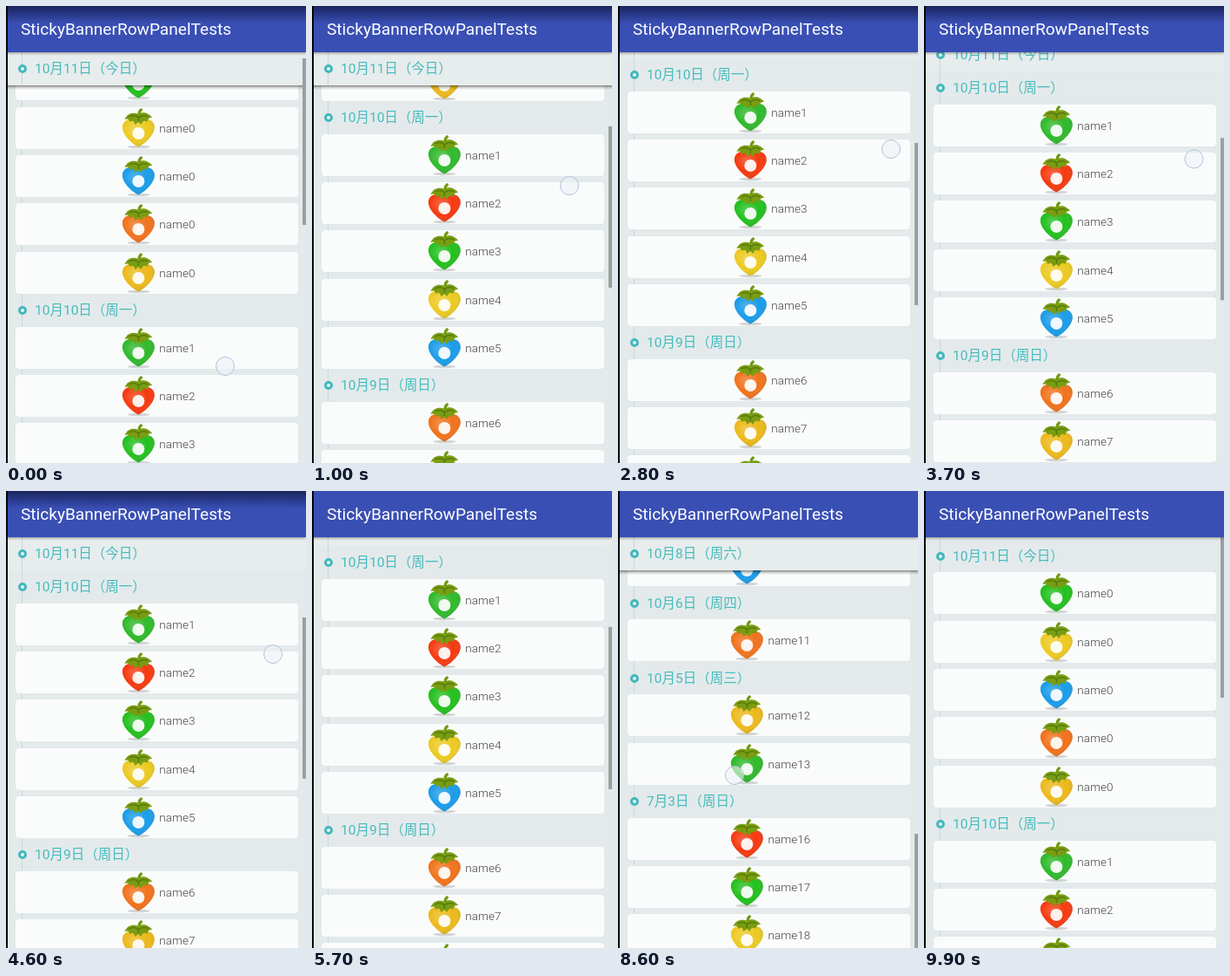
These frames come from a looping animation (345x524 px, 10 s). An HTML page:

```html
<!DOCTYPE html>
<html lang="zh-CN">
<head>
<meta charset="utf-8">
<title>Sticky list</title>
<style>
  html, body { margin: 0; width: 100%; height: 100%; overflow: hidden; }
  #stage {
    position: relative; width: 345px; height: 524px; overflow: hidden;
    background: #e4eaeb; font-family: Roboto, "Noto Sans CJK SC", "Noto Sans CJK", sans-serif;
  }
  #stage div, #stage svg { position: absolute; }
  .line { left: 17.5px; top: 0; width: 1.6px; height: 100%; background: #cdd5d6; }
  #list { left: 0; top: 0; width: 345px; will-change: transform; }
  .head {
    left: 0; width: 345px; height: 38px; padding-left: 33px; box-sizing: border-box;
    font-size: 15.5px; line-height: 38px; color: #46bbbe; white-space: nowrap;
  }
  .head::before {
    content: ""; position: absolute; left: 13.5px; top: 14px; width: 4.4px; height: 4.4px;
    border: 3px solid #42b8bc; border-radius: 50%; background: #eef3f3;
  }
  .card {
    left: 11px; width: 325px; height: 48px; border-radius: 4px; background: #fafcfb;
    box-shadow: 0 0 1px #d3dede; display: flex; justify-content: center; align-items: center;
    font-size: 13.5px; font-weight: 300; color: #444;
  }
  #stage .card svg { position: relative; left: -.8px; width: 46.7px; height: 48px; flex: none; }
  #pin { left: 0; top: 0; width: 345px; height: 38px; background: #e7ecec; }
  #pin .head { top: 0; }
  #shade {
    left: 0; top: 38px; width: 100%;
    background: linear-gradient(rgba(0,0,0,.46), rgba(0,0,0,.14) 55%, transparent);
  }
  #thumb { left: 341px; top: 0; width: 4px; background: #9a9fa0; }
  #touch {
    left: -11px; top: -11px; width: 20px; height: 20px; border-radius: 50%;
    border: 1.2px solid #b4bedd; background: rgba(238,242,246,.6);
  }
  #bar {
    left: 0; top: 0; width: 345px; height: 53px; background: #394fb4;
    box-shadow: 0 1px 3px rgba(0,0,0,.4);
    color: #fff; font-size: 19.1px; line-height: 54px; text-indent: 17px; white-space: nowrap;
  }
  #dim { left: 0; top: 0; width: 100%; height: 20px; background: linear-gradient(#1a245e, rgba(26,36,94,0)); }
  #edge { left: 0; top: 0; width: 1.5px; height: 100%; background: #050608; }
</style>
</head>
<body>
<svg width="0" height="0" style="position:absolute">
  <defs>
    <radialGradient id="gloss" cx=".4" cy=".35" r=".75">
      <stop offset="0" stop-color="#fff" stop-opacity=".25"/>
      <stop offset=".5" stop-color="#fff" stop-opacity="0"/>
      <stop offset="1" stop-color="#000" stop-opacity=".2"/>
    </radialGradient>
    <path id="body" d="M0 21.5C-5 19.5-18.5 9-18.5-1C-18.5-9-10-12 0-9C10-12 18.5-9 18.5-1C18.5 9 5 19.5 0 21.5Z"/>
    <symbol id="berry" viewBox="-23.35 -24 46.7 48">
      <ellipse cy="21.5" rx="13" ry="1.8" fill="#000" opacity=".16"/>
      <use href="#body" fill="currentColor"/>
      <use href="#body" fill="url(#gloss)"/>
      <path d="M-1-14C-1-19 0-21 3-23L5-21C3-19 2-17 2-14Z" fill="#6f9a14"/>
      <path d="M0-16C5-19 11-18 16-12C12-12 11-11 10-7C7-9 5-9 3-4L0-7L-4-4C-5-9-7-9-10-7C-11-11-13-11-16-10C-13-17-6-19 0-16Z" fill="#7a9c12"/>
      <path d="M-11-13Q-4-16 0-12Q5-16 11-13M0-12V-8" fill="none" stroke="#4f760a" stroke-width="1.2"/>
      <circle cy="6" r="7" fill="#fff" opacity=".92"/>
    </symbol>
  </defs>
</svg>
<div id="stage">
  <div class="line"></div>
  <div id="list"></div>
  <div id="pin"><div class="line"></div><div class="head"></div><div id="shade"></div></div>
  <div id="thumb"></div>
  <div id="touch"></div>
  <div id="bar">StickyBannerRowPanelTests<div id="dim"></div></div>
  <div id="edge"></div>
</div>
<script>
const LOOP = 10000, STEP = 100;
const FIRST = 75, PIN = 72, HEAD = 38, GAP = 43, PITCH = 55.3;
const colors = ['#2fb92b', '#f6390f', '#22c01e', '#ecca22', '#1a9ce9', '#f1721b', '#ecb91b'];
const sections = [
  ['10月11日（今日）', 0, 0, 0, 0, 0],
  ['10月10日（周一）', 1, 2, 3, 4, 5],
  ['10月9日（周日）', 6, 7, 8, 9, 10],
  ['10月8日（周六）', 14, 15],
  ['10月6日（周四）', 11],
  ['10月5日（周三）', 12, 13],
  ['7月3日（周日）', 16, 17, 18]
];
// [time, scroll]
const scrollKeys = [[0, 33], [1000, 254], [2800, 303], [4600, 272], [5500, 272], [6800, 811],
  [8100, 1018], [8300, 1018], [8600, 1009], [9100, 600], [9700, 0], [10000, 0]];
// [time, x, y]
const touches = [
  [[0, 252, 413], [1000, 296, 206], [2800, 314, 164], [4600, 307, 187], [5500, 307, 187]],
  [[8400, 134, 317], [8600, 134, 326], [8800, 138, 420]]
];
// [scroll, top, height]
const thumbKeys = [[0, 53, 184], [33, 60, 191], [254, 138, 185], [303, 157, 186], [811, 330, 162], [1018, 396, 133]];

const $ = id => document.getElementById(id);
const list = $('list'), pin = $('pin'), shade = $('shade'), thumb = $('thumb'), touch = $('touch'), dim = $('dim');
const pinText = pin.querySelector('.head');

function add(cls, html, top) {
  const el = document.createElement('div');
  el.className = cls;
  el.innerHTML = html;
  el.style.top = Math.round(top) + 'px';
  list.append(el);
}

const heads = [];
let y = FIRST, count = 2;
for (const [label, ...names] of sections) {
  heads.push({ label, y: Math.round(y) });
  add('head', label, y - HEAD / 2);
  y += GAP;
  names.forEach((n, i) => {
    if (i) y += PITCH;
    const color = colors[count++ % colors.length];
    add('card', `<svg style="color:${color}"><use href="#berry"/></svg><span>name${n}</span>`, y - 24.6);
  });
  y += GAP;
}

// Monotone cubic through the keys
function sample(keys, t, c = 1) {
  const last = keys.length - 1;
  let i = 0;
  while (i < last - 1 && t >= keys[i + 1][0]) i++;
  const slope = k => (keys[k + 1][c] - keys[k][c]) / (keys[k + 1][0] - keys[k][0]);
  const tangent = k => {
    if (k === 0 || k === last) return slope(k ? k - 1 : 0);
    const a = slope(k - 1), b = slope(k);
    return a * b > 0 ? 2 * a * b / (a + b) : 0;
  };
  const [a, b] = [keys[i], keys[i + 1]], d = b[0] - a[0];
  const u = Math.min(1, Math.max(0, (t - a[0]) / d)), v = 1 - u;
  return a[c] * v * v * (1 + 2 * u) + b[c] * u * u * (3 - 2 * u)
    + d * u * v * (tangent(i) * v - tangent(i + 1) * u);
}

const shift = (el, x, y) => el.style.transform = `translate(${x}px,${y}px)`;

function draw(t) {
  const s = Math.round(sample(scrollKeys, t));
  shift(list, 0, -s);

  let k = -1;
  while (k + 1 < heads.length && heads[k + 1].y - s < PIN) k++;
  pin.style.display = k < 0 ? 'none' : '';
  if (k >= 0) {
    const room = k + 1 < heads.length ? heads[k + 1].y - s - PIN - HEAD : 99;
    pinText.textContent = heads[k].label;
    shift(pin, 0, PIN - HEAD / 2 + Math.min(0, room));
    shade.style.height = Math.max(0, Math.min(5, room)) + 'px';
  }

  shift(thumb, 0, sample(thumbKeys, s, 1));
  thumb.style.height = sample(thumbKeys, s, 2) + 'px';

  const path = touches.find(p => t >= p[0][0] && t < p[p.length - 1][0]);
  touch.style.display = path ? '' : 'none';
  if (path) shift(touch, sample(path, t, 1), sample(path, t, 2));

  dim.style.display = t < 5600 ? '' : 'none';
}

const start = performance.now();
function tick() {
  const t = (performance.now() - start) % LOOP;
  draw(Math.floor(t / STEP) * STEP);
  requestAnimationFrame(tick);
}
tick();
</script>
</body>
</html>
```
